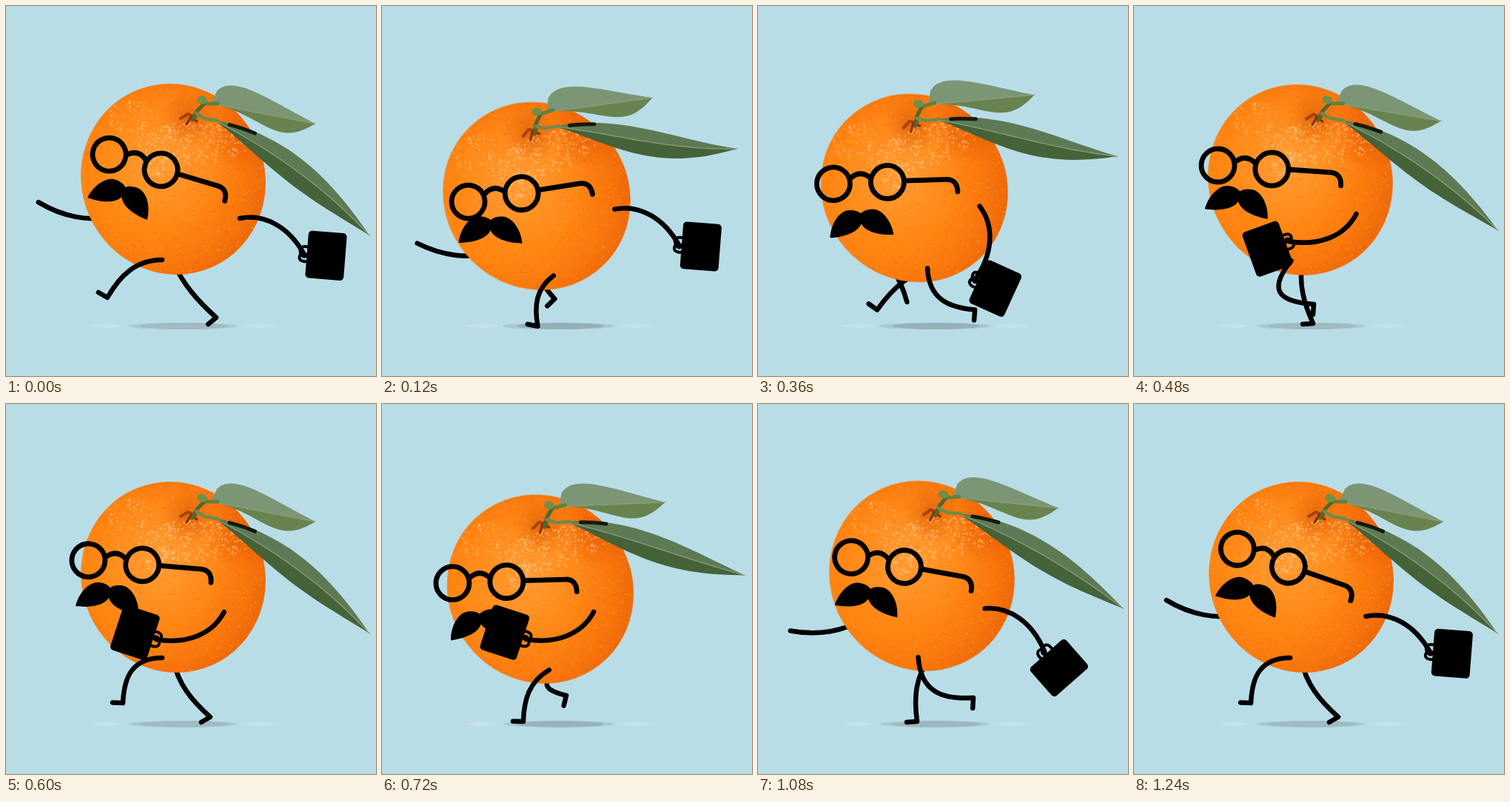
Recreate the animation shown at these times as an HTML page with a canvas. Size 500 by 500 pixels, loop 1280 ms.

```html
<!DOCTYPE html>
<html lang="en">
<head>
<meta charset="utf-8">
<title>Walking orange</title>
<style>
html, body { margin: 0; width: 100%; height: 100%; overflow: hidden; background: #b9dde7; }
canvas { display: block; width: 500px; height: 500px; }
</style>
</head>
<body>
<canvas id="stage" width="500" height="500"></canvas>
<script>
const ctx = document.getElementById('stage').getContext('2d');
const LOOP = 1280, STEP = 40, CYCLE = LOOP / 2, GROUND = 430;
const BG = '#b9dde7', INK = '#000';
const { sin, cos, PI, min, max, sqrt, hypot } = Math;
const rad = d => d * PI / 180;
const mod = (t, n) => ((t % n) + n) % n;
const mix = (a, b, w) => a + (b - a) * w;
const ease = (t, a, b) => (1 - cos(PI * max(0, min(1, (t - a) / (b - a))))) / 2;

// Smooth periodic interpolation of rows [time, ...values]
function track(rows, period) {
  const n = rows.length;
  const key = i => {
    const wrap = Math.floor(i / n), [t, ...v] = rows[i - wrap * n];
    return { t: t + wrap * period, v };
  };
  return time => {
    const t = mod(time, period), i = rows.findLastIndex(r => r[0] <= t);
    const a = key(i - 1), b = key(i), c = key(i + 1), d = key(i + 2);
    const h = c.t - b.t, u = (t - b.t) / h, s = u * u * (3 - 2 * u);
    return b.v.map((p, k) => {
      const q = c.v[k], m = (q - a.v[k]) / (c.t - a.t) * h, w = (d.v[k] - p) / (d.t - b.t) * h;
      return mix(p, q, s) + u * (1 - u) * (m * (1 - u) - w * u);
    });
  };
}

// How far the fruit leans back, 0 to 1, once per stride
function lean(time) {
  const t = mod(time, CYCLE);
  return t < 240 ? sin(PI / 2 * t / 240) : 1 - ease(t, 240, 520);
}
function body(time) {
  const tilt = lean(time) * 28;
  const hop = 17 * Math.exp(-(((mod(time, CYCLE) - 400) / 45) ** 2));
  return [226 - .86 * tilt, 234 + 1.15 * tilt - hop, -tilt];
}
function onBody([cx, cy, deg], x, y) {
  const c = cos(rad(deg)), s = sin(rad(deg));
  return [cx + x * c - y * s, cy + x * s + y * c];
}

// Face parts relative to the body: x, y, angle
const turn = t => 2 * PI * t / LOOP;
function glasses(t) {
  const c = cos(turn(t)), shake = sin(3 * turn(t));
  return [-65 + 13.5 * c, -23 + 6 * shake, 12 + 4.5 * c - 5 * shake];
}
function moustache(t) {
  const a = turn(t), c = cos(a);
  return [-82.5 + 7 * c - 5 * lean(t), 42.5 - 2.5 * (c + lean(t)), 14 + 6.5 * c + 1.5 * sin(a)];
}

// Arm angles from straight down
function frontSwing(time) {
  const t = mod(time, LOOP);
  return 61 - 129 * (ease(t, 240, 480) - ease(t, 730, 1140));
}
const backSwing = t => -101 + 176 * (ease(t, 80, 490) - ease(t, 870, 1140));

// Ankle x, y and knee bend
const frontFoot = track([
  [0, 137, 394, 20], [80, 191, 429, 17], [240, 260, 429, 21], [340, 290, 414, 28],
  [440, 291, 397, 36], [480, 243, 403, 50], [600, 158, 404, 30]
], CYCLE);
const backFoot = track([
  [0, 284, 421, 8], [80, 249, 394, 34], [240, 187, 412, 36], [320, 146, 404, 20],
  [440, 215, 429, 14], [480, 242, 429, 10], [600, 276, 423, 12]
], CYCLE);

function ink(width = 6.5) {
  ctx.strokeStyle = ctx.fillStyle = INK;
  ctx.lineWidth = width;
}

// Bent line; handles are given along and across the straight way from a to b
function limb(a, b, h1, h2, end) {
  const dx = b[0] - a[0], dy = b[1] - a[1], d = hypot(dx, dy);
  const handle = ([along, off]) => [a[0] + dx * along + dy / d * off, a[1] + dy * along - dx / d * off];
  const c2 = handle(h2);
  ink();
  ctx.beginPath();
  ctx.moveTo(...a);
  ctx.bezierCurveTo(...handle(h1), ...c2, ...b);
  if (end) ctx.lineTo(...end(c2));
  ctx.stroke();
}

// The foot stands square to the shin but never sinks into the ground
function drawLeg(hip, [x, y, bend]) {
  limb(hip, [x, y], [.33, -bend], [.65, -bend * .75], ([sx, sy]) => {
    const size = 14, dy = min((x - sx) / hypot(x - sx, y - sy) * size, GROUND - y);
    return [x - sqrt(max(0, size * size - dy * dy)), y + dy];
  });
}

function drawArm(shoulder, angle, bulge) {
  const hand = [shoulder[0] + 99 * sin(rad(angle)), shoulder[1] + 99 * cos(rad(angle))];
  limb(shoulder, hand, [.26, bulge], [.64, bulge]);
  return hand;
}

function shape(pts) {
  const p = new Path2D();
  pts.forEach(q => p.lineTo(...q));
  return p;
}
function strokePts(g, pts, color, width) {
  g.strokeStyle = color;
  g.lineWidth = width;
  g.stroke(shape(pts));
}

// Blade around a bent rib; each side has a half width and a skew of its widest place
function drawLeaf({ base, tip, sag, up, low, light, dark }) {
  const dx = tip[0] - base[0], dy = tip[1] - base[1], d = hypot(dx, dy);
  const rib = [], top = [], under = [];
  for (let i = 0; i <= 30; i++) {
    const s = i / 30, r = 1 - s;
    const mid = 3 * s * r * (r * sag[0] + s * sag[1]);
    const at = off => [base[0] + dx * s - dy / d * off, base[1] + dy * s + dx / d * off];
    const half = ([width, skew]) => width * sin(PI * s ** skew);
    rib.push(at(mid));
    top.push(at(mid - half(up)));
    under.push(at(mid + half(low)));
  }
  const back = [...rib].reverse();
  ctx.fillStyle = light;
  ctx.fill(shape([...top, ...back]));
  ctx.fillStyle = dark;
  ctx.fill(shape([...under, ...back]));
  strokePts(ctx, rib, '#8c9f79', 1.2);
  return top;
}

function drawLeaves(bend) {
  const top = drawLeaf({
    base: [57, -79], tip: [mix(265, 285, bend), mix(76, 4, bend)],
    sag: [mix(-14, 10, bend), mix(-16, 32, bend)],
    up: [17, .8], low: [19, 1.1], light: '#5d7a54', dark: '#456239'
  });
  strokePts(ctx, top.slice(2, 7).map(([x, y]) => [x, y + 2]), '#14190d', 5);
  drawLeaf({
    base: [51, -102], tip: [192, mix(-75, -70, bend)], sag: [0, 0],
    up: [30, .45], low: [20, 2], light: '#7c9575', dark: '#68834f'
  });
}

// The fruit is painted once and then only turned
function paintFruit() {
  const c = document.createElement('canvas');
  c.width = c.height = 280;
  const g = c.getContext('2d');
  g.translate(140, 140);
  g.lineCap = 'round';
  g.beginPath();
  g.ellipse(0, 0, 130, 123.8, rad(66), 0, 7);
  g.clip();
  const glow = (x, y, r, stops) => {
    const f = g.createRadialGradient(x, y, 0, x, y, r);
    stops.forEach((s, i) => f.addColorStop(i / (stops.length - 1), s));
    g.fillStyle = f;
    g.fillRect(-140, -140, 280, 280);
  };
  glow(-34, -10, 170, ['#ff9426', '#ff8d1b', '#ff8512', '#fa780d', '#ea6508']);
  glow(-5, -30, 95, ['rgba(255,170,80,.4)', 'rgba(255,160,60,0)']);
  glow(92, -58, 50, ['rgba(226,78,0,.55)', 'rgba(226,78,0,0)']);
  glow(22, -82, 38, ['rgba(205,75,0,.6)', 'rgba(220,90,0,0)']);

  let seed = 7;
  const rnd = () => (seed = seed * 16807 % 2147483647) / 2147483647;
  const dots = (n, x, y, rx, ry, size, colors) => {
    for (let i = 0; i < n; i++) {
      const a = rnd() * 2 * PI, r = sqrt(rnd());
      g.fillStyle = colors[i % colors.length];
      g.beginPath();
      g.ellipse(x + cos(a) * r * rx, y + sin(a) * r * ry, size * (.6 + rnd()), size * .7, rnd() * 3, 0, 7);
      g.fill();
    }
  };
  dots(1300, 0, 0, 130, 130, 1.3, ['rgba(255,165,65,.3)', 'rgba(226,90,0,.2)']);
  const shine = ['rgba(255,205,145,.55)', 'rgba(255,185,105,.5)'];
  dots(220, 25, -48, 78, 28, 1.7, shine);
  dots(60, -15, -20, 24, 18, 1.8, shine);
  dots(70, -60, -85, 32, 24, 1.4, shine);
  // Hollow around the stalk
  strokePts(g, [[10, -82], [20, -88], [30, -84]], '#a8400a', 4);
  strokePts(g, [[18, -74], [24, -84], [32, -78]], '#7c3109', 3);
  return c;
}
const fruit = paintFruit();

function drawStalk() {
  strokePts(ctx, [[38, -106], [46, -102], [60, -102]], '#64803f', 5);
  strokePts(ctx, [[42, -102], [32, -92], [26, -80]], '#4f682f', 5);
  strokePts(ctx, [[31, -89], [42, -82], [60, -79]], '#6f8b4a', 4.5);
  ctx.fillStyle = '#6f8f4a';
  ctx.beginPath();
  ctx.ellipse(39, -107, 7, 5.5, .3, 0, 7);
  ctx.fill();
}

function placed([x, y, deg], draw) {
  ctx.save();
  ctx.translate(x, y);
  ctx.rotate(rad(deg));
  draw();
  ctx.restore();
}

function drawGlasses() {
  ink(6.8);
  for (const x of [-36.5, 36.5]) {
    ctx.beginPath();
    ctx.arc(x, 0, 22.5, 0, 7);
    ctx.stroke();
  }
  ctx.stroke(new Path2D('M-14-6Q0-19 14-6M60-1H116C126-1 131 5 131 16'));
}
function drawMoustache() {
  ink();
  ctx.fill(new Path2D('M-43 0C-41-20-28-36-16-36C-8-36-3-34 0-31C3-34 8-36 16-36' +
    'C28-36 41-20 43 0C28 0 6-4 0-17C-6-4-28 0-43 0Z'));
}
function drawCase() {
  ink(4);
  ctx.beginPath();
  ctx.roundRect(-32, 4, 64, 52, 5);
  ctx.fill();
  ctx.stroke(new Path2D('M-10 5C-11-7-5-7 0-4C5-7 11-7 10 5M0-4C-6 0-4 4 0 3'));
}

function drawShadow(low) {
  const oval = (x, rx, ry, color) => {
    ctx.fillStyle = color;
    ctx.beginPath();
    ctx.ellipse(x, 432.5, rx, ry, 0, 0, 7);
    ctx.fill();
  };
  oval(135, 20 + 2 * low, 3, '#c5e1e4');
  oval(343, 20 + low, 3, '#c5e1e4');
  oval(239, 73 + 4 * low, 4.6, '#abc8cf');
  const tone = [160, 187, 194].map(n => n - 16 * low);
  oval(241, 59, 4.4, `rgb(${tone})`);
}

function draw(t) {
  const at = body(t), back = lean(t), a = turn(t);
  ctx.lineCap = ctx.lineJoin = 'round';
  ctx.fillStyle = BG;
  ctx.fillRect(0, 0, 500, 500);
  drawShadow(back);
  drawLeg(onBody(at, 0, 112), backFoot(t));
  drawArm(onBody(at, -85, 50), backSwing(t), 13);
  placed(at, () => {
    ctx.drawImage(fruit, -140, -140);
    drawLeaves(back ** 1.4);
    drawStalk();
    placed(glasses(t), drawGlasses);
    placed(moustache(t), drawMoustache);
  });
  drawLeg(onBody(at, -15, 109), frontFoot(t));
  const shoulder = onBody(at, 78 + 12 * cos(a) + 4 * sin(a) + 3 * sin(3 * a), 50 + 3 * cos(a));
  const hand = drawArm(shoulder, frontSwing(t), 22);
  placed([...hand, 6 - 1.5 * frontSwing(t - 70)], drawCase);
}

function tick() {
  draw(Math.floor(performance.now() % LOOP / STEP) * STEP);
  requestAnimationFrame(tick);
}
tick();
</script>
</body>
</html>
```
